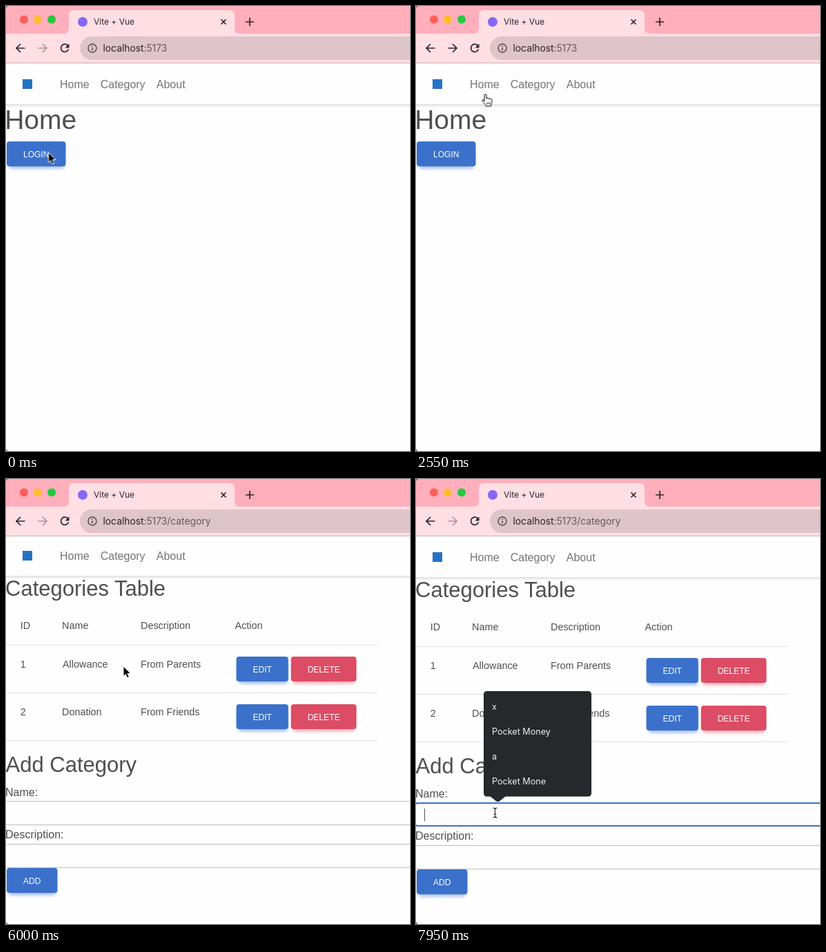
An HTML page for the animation above (8 s loop, 585 by 644 pixels).

```html
<!DOCTYPE html>
<html lang="en">
<head>
<meta charset="utf-8">
<title>Vite + Vue</title>
<style>
html, body { margin: 0; width: 100%; height: 100%; overflow: hidden; background: #fefefe; }
svg { display: block; width: 585px; height: 644px; }

.ui { font-family: Inter, Roboto, sans-serif; }
.page { font-family: "Liberation Sans", Arial, sans-serif; font-size: 16px; fill: #4f4f4f; }
.h1 { font-size: 39px; }
.h2 { font-size: 31px; }
.table { font-size: 14.4px; }
.links { fill: #747474; }
.url { font-size: 13.8px; fill: #64565a; }
.url tspan { fill: #2b2326; }
.btn text { font-size: 12px; fill: #fff; }
.blue { fill: #3b71ca; }
.red { fill: #dc4c64; }
.glow { filter: blur(2.5px); opacity: .5; }
.icon { fill: none; stroke: #2c2427; stroke-width: 1.7; }
.field { fill: #fefefe; stroke: #bdbdbd; }
.rule { stroke: #e0e0e0; }
.status rect { fill: #ffaebc; stroke: #cf93a0; }
.status text { font-size: 12px; fill: #2b2326; }
.popup text { font-size: 12.6px; fill: #f1f1f2; }

/* Every state lives on the same 8 s clock; percent = ms / 80. */
.t { animation: 8s step-end infinite; }
.home { animation-name: home; }
.login { animation-name: login; }
.cat { animation-name: cat; }
.nav { animation-name: nav; }
.forward { animation-name: forward; }
.hoverHome { animation-name: hoverHome; }
.hoverCat { animation-name: hoverCat; }
.sLogin { animation-name: sLogin; }
.sHome { animation-name: sHome; }
.sCat { animation-name: sCat; }
.scroll { animation-name: scroll; }
.focus { animation-name: focus; }
.popup { animation-name: popup; }
.arrow { animation-name: arrow; }
.hand { animation-name: hand; }
.beam { animation-name: beam; }

@keyframes home { 0%, 22.5% { opacity: 1 } 7.5%, 56.25%, to { opacity: 0 } }
@keyframes login { 0%, 22.5%, to { opacity: 0 } 7.5% { opacity: 1 } }
@keyframes cat { 0% { opacity: 0 } 56.25%, to { opacity: 1 } }
@keyframes nav { 0%, 22.5%, to { opacity: 1 } 7.5% { opacity: 0 } }
@keyframes forward { 0%, 56.25%, to { opacity: .4 } 22.5% { opacity: 1 } }
@keyframes hoverHome { 0%, 43.125%, to { fill: #747474 } 33.75% { fill: #444 } }
@keyframes hoverCat { 0%, 69.375%, to { fill: #747474 } 46.875% { fill: #444 } }
@keyframes sLogin { 0%, 18.75%, to { opacity: 0 } 5.625% { opacity: 1 } }
@keyframes sHome { 0%, 45%, to { opacity: 0 } 35.625% { opacity: 1 } }
@keyframes sCat { 0%, 71.25%, to { opacity: 0 } 50.625% { opacity: 1 } }
@keyframes scroll { 0%, 82.5%, to { transform: none } 71.25% { transform: translateY(-2px) } }
@keyframes focus { 0% { opacity: 0 } 95.625%, to { opacity: 1 } }
@keyframes popup { 0% { opacity: 0 } 97.5%, to { opacity: 1 } }
@keyframes arrow { 0%, 7.5%, 69.375% { opacity: 1 } 3.75%, 31.875%, 93.75%, to { opacity: 0 } }
@keyframes hand { 0%, 7.5%, 69.375%, to { opacity: 0 } 3.75%, 31.875% { opacity: 1 } }
@keyframes beam { 0% { opacity: 0 } 93.75%, to { opacity: 1 } }

/* The pointer advances once every 150 ms. */
.pointer { animation: pointer 8s infinite; }
@keyframes pointer {
  0%, 7.5% { transform: translate(61.5px, 212px); animation-timing-function: steps(3) }
  13.125% { transform: translate(73.5px, 183px); animation-timing-function: steps(1) }
  15% { transform: translate(72px, 170px); animation-timing-function: steps(3) }
  20.625%, 24.375% { transform: translate(22px, 62px); animation-timing-function: steps(4) }
  31.875% { transform: translate(100.5px, 128px); animation-timing-function: steps(1) }
  33.75% { transform: translate(105px, 121px); animation-timing-function: steps(4) }
  41.25% { transform: translate(120px, 118px); animation-timing-function: steps(4) }
  48.75% { transform: translate(160.5px, 121px); animation-timing-function: steps(1) }
  50.625%, 67.5% { transform: translate(164px, 118px); animation-timing-function: steps(4) }
  75% { transform: translate(170px, 271px); animation-timing-function: steps(6) }
  86.25% { transform: translate(245px, 372px); animation-timing-function: steps(5) }
  95.625%, to { transform: translate(114.5px, 483px); animation-timing-function: steps(1) }
}
</style>
</head>
<body>
<svg viewBox="0 0 585 644">
  <defs>
    <clipPath id="view"><rect y="83" width="585" height="561"/></clipPath>
    <linearGradient id="shade" x2="0" y2="1">
      <stop stop-color="#dedede"/><stop offset="1" stop-color="#fefefe"/>
    </linearGradient>
    <g id="edit" class="btn">
      <rect class="blue glow" x="3" y="7" width="71" height="32" rx="4"/>
      <rect class="blue" width="75.3" height="36" rx="4"/>
      <text x="24" y="23">EDIT</text>
    </g>
    <g id="delete" class="btn">
      <rect class="red glow" x="3" y="7" width="89" height="32" rx="4"/>
      <rect class="red" width="94.7" height="36" rx="4"/>
      <text x="24" y="23">DELETE</text>
    </g>
  </defs>
  <rect width="585" height="644" fill="#fefefe"/>

  <g class="page" clip-path="url(#view)">
    <g class="t scroll">
      <g class="t nav">
        <rect y="142" width="585" height="5" fill="url(#shade)"/>
        <rect x="24" y="106" width="14" height="14" fill="#2673c4"/>
        <g class="links">
          <text class="t hoverHome" x="78" y="119">Home</text>
          <text class="t hoverCat" x="136.7" y="119">Category</text>
          <text x="217.8" y="119">About</text>
        </g>
      </g>

      <g class="t home">
        <text class="h1" x="-1.8" y="178">Home</text>
        <g class="btn" transform="translate(1 196)">
          <rect class="blue glow" x="3" y="7" width="80" height="32" rx="4"/>
          <rect class="blue" width="85.5" height="36" rx="4"/>
          <text x="24" y="23">LOGIN</text>
        </g>
      </g>

      <text class="t login h1" x="-2" y="119">Login</text>

      <g class="t cat">
        <text class="h2" x="-1" y="171">Categories Table</text>
        <g class="table">
          <text x="20.8" y="219">ID</text>
          <text x="81" y="219">Name</text>
          <text x="195" y="219">Description</text>
          <text x="331.5" y="219">Action</text>
          <text x="20.8" y="275">1</text>
          <text x="82" y="275">Allowance</text>
          <text x="195" y="275">From Parents</text>
          <text x="20.8" y="344">2</text>
          <text x="81" y="344">Donation</text>
          <text x="195" y="344">From Friends</text>
        </g>
        <path class="rule" d="M0 242.5H538M0 311.5H538M0 380.5H538"/>
        <use href="#edit" x="333.5" y="259"/>
        <use href="#delete" x="412.7" y="259"/>
        <use href="#edit" x="333.5" y="328"/>
        <use href="#delete" x="412.7" y="328"/>

        <text class="h2" x="-.5" y="426">Add Category</text>
        <text x="-1" y="461">Name:</text>
        <rect class="field" x="-1.5" y="468.5" width="600" height="34" rx="4"/>
        <text x="-1" y="522">Description:</text>
        <rect class="field" x="-1.5" y="530.5" width="600" height="34" rx="4"/>
        <g class="btn" transform="translate(1 565)">
          <rect class="blue glow" x="3" y="7" width="68" height="32" rx="4"/>
          <rect class="blue" width="73.5" height="36" rx="4"/>
          <text x="24" y="23">ADD</text>
        </g>
      </g>
    </g>

    <g class="t focus" fill="none">
      <rect x="-1" y="469" width="600" height="33" rx="3.5" stroke="#3b71ca" stroke-width="2"/>
      <path d="M12.5 477V495" stroke="#4f4f4f"/>
    </g>
  </g>

  <g class="ui">
    <g class="t popup">
      <path d="M107 459H130L120.5 466.5Q118.500 468 116.500 466.5Z" fill="#26282c"/>
      <rect x="98" y="307" width="156" height="152.500" rx="4.500" fill="#26282c"/>
      <text x="110" y="334">x</text>
      <text x="110" y="370">Pocket Money</text>
      <text x="110" y="406">a</text>
      <text x="110" y="442">Pocket Mone</text>
    </g>

    <rect width="585" height="41" fill="#ffaebc"/>
    <path d="M0 40H83Q91 40 91 32V14Q91 6 99 6H323Q331 6 331 14V32Q331 40 339 40H585V82H0Z" fill="#ffdfe4"/>
    <path d="M0 82.500H585" stroke="#c9b0b5"/>
    <circle cx="26" cy="19.500" r="6" fill="#fe5f57"/>
    <circle cx="46" cy="19.500" r="6" fill="#febc2e"/>
    <circle cx="66" cy="19.500" r="6" fill="#28c840"/>
    <circle cx="111" cy="23" r="7" fill="#8568f6"/>
    <text x="127" y="27" font-size="12" fill="#2b2326">Vite + Vue</text>
    <path class="icon" d="M311.500 19.500l7 7m0-7l-7 7"/>
    <path class="icon" stroke-width="2" d="M347 23h12m-6-6v12"/>

    <path class="icon" d="M27.500 61H15m6-6l-6 6l6 6"/>
    <path class="icon t forward" d="M46.500 61H59m-6-6l6 6l-6 6"/>
    <path class="icon" d="M89.600 57.400A5.600 5.600 0 1 0 90.500 62.500"/>
    <path d="M91.500 54.500V60.500H85.500Z" fill="#2c2427"/>

    <rect x="107" y="44" width="500" height="34" rx="17" fill="#dfc4c9"/>
    <circle cx="125" cy="61" r="6" fill="none" stroke="#54464a" stroke-width="1.400"/>
    <path d="M125 60.300V64.300M125 57.500V59" stroke="#54464a" stroke-width="1.500"/>
    <g class="url">
      <text class="t home" x="140.500" y="66"><tspan>localhost</tspan>:5173</text>
      <text class="t login" x="140.500" y="66"><tspan>localhost</tspan>:5173/login</text>
      <text class="t cat" x="140.500" y="66"><tspan>localhost</tspan>:5173/category</text>
    </g>

    <g class="status">
      <g class="t sLogin">
        <rect x="-4.500" y="625.500" width="129.500" height="24" rx="4"/>
        <text x="3.500" y="640">localhost:5173/login</text>
      </g>
      <g class="t sHome">
        <rect x="-4.500" y="625.500" width="98" height="24" rx="4"/>
        <text x="3.500" y="640">localhost:5173</text>
      </g>
      <g class="t sCat">
        <rect x="-4.500" y="625.500" width="154" height="24" rx="4"/>
        <text x="3.500" y="640">localhost:5173/category</text>
      </g>
    </g>
  </g>

  <path d="M0 0H3Q1 1 0 3ZM0 644V641Q1 643 3 644Z" fill="#6b6468"/>

  <g class="pointer">
    <path class="t arrow" d="M0 0V14.500L3.300 11.500L5.600 16.800L8.200 15.700L5.900 10.500H10.500Z" fill="#000" stroke="#fff" stroke-linejoin="round"/>
    <g class="t hand" stroke="#000" stroke-linejoin="round">
      <path d="M-1.500 10V1.200a1.500 1.500 0 0 1 3 0V6c0-1.500 2.700-1.500 2.700 .4c.3-1.200 2.600-1.200 2.700 .5c.5-1 2.400-.8 2.400 .8V11c0 2-1.300 3-1.300 6H1c-.5-2.500-3-4.500-5.500-7.500c-.8-1.200 .5-2.600 1.800-1.600z" fill="#fff"/>
      <path d="M2.500 11.500v3m2-3v3m2-3v3" stroke-width=".8"/>
    </g>
    <g class="t beam" fill="none">
      <path d="M-3-7Q0-7 0-5Q0-7 3-7M0-5V5M-3 7Q0 7 0 5Q0 7 3 7M-1.500 2H1.500" stroke="#fff" stroke-width="2.500"/>
      <path d="M-3-7Q0-7 0-5Q0-7 3-7M0-5V5M-3 7Q0 7 0 5Q0 7 3 7M-1.500 2H1.500" stroke="#111" stroke-width="1.200"/>
    </g>
  </g>
</svg>
</body>
</html>
```
